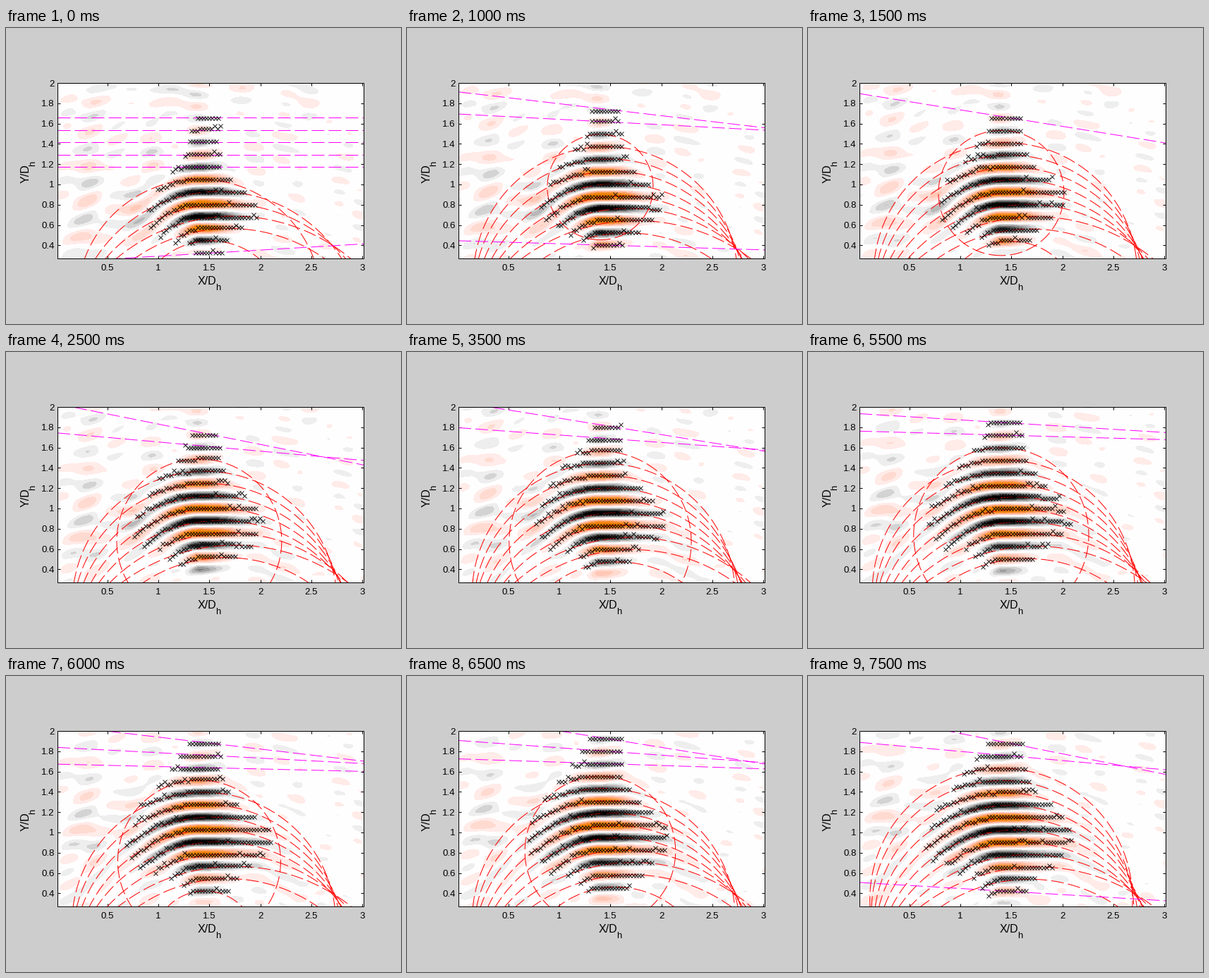
A matplotlib script for the animation above (8 s loop, 560x420 px).

```python
import numpy as np
import matplotlib.pyplot as plt
from matplotlib.animation import FuncAnimation
from matplotlib.colors import LinearSegmentedColormap

W, H, DPI = 560, 420, 100
PX = 72 / DPI
FRAMES, STEP = 16, 500
X0, X1, Y0, Y1 = 0.008, 3.015, 0.27, 2.0
SPACING, SPEED = 0.1215, 0.0387  # between crests, and rise per step
MID = 1.4                        # x where the crests peak

plt.rcParams["font.family"] = "Liberation Sans"
plt.rcParams["axes.linewidth"] = PX

steps = np.linspace(.08, .78, 8)
LEVELS = [-9, *-steps[::-1], *steps, 9]
cmap = LinearSegmentedColormap.from_list("wave", [
    (0, "#000000"), (.25, "#9c9c9c"), (.44, "#eeeeee"), (.5, "#ffffff"),
    (.56, "#ffecea"), (.75, "#ffb8a0"), (.87, "#fb9440"), (1, "#ee8000")])
COLORS = cmap(np.linspace(0, 1, len(LEVELS) - 1))


def top(k, f):
    return 0.93 + SPACING * k + SPEED * f


def lerp(a, b, w):
    return a + (b - a) * w


def bell(t, center, width):
    return np.exp(-((t - center) / width) ** 2)


def span(t, f):
    """Left and right end of the crest whose top is at height t."""
    w = (f / (FRAMES - 1)) ** 0.6
    left = 1.36 - lerp(.46, .69, w) * bell(t, lerp(.9, 1.18, w), lerp(.34, .5, w))
    right = 1.6 + lerp(.38, .5, w) * bell(t, lerp(.78, .95, w), lerp(.27, .4, w))
    return left, right


def power(t, f):
    w = (f / (FRAMES - 1)) ** 0.6
    floor = np.clip((t - lerp(.32, .22, w)) / .12, 0, 1)
    return (.15 + .8 * bell(t, lerp(.72, 1.05, w), .58)) * floor


def bend(x, u):
    """Drop of a crest below its top: round on the left, nearly flat on the right."""
    s, e = np.maximum(0, MID - x), np.maximum(0, x - 1.75)
    return s ** 2 / (2.4 * np.maximum(u, .16)) + .1 * e ** 2


gx, gy = np.meshgrid(np.arange(X0, X1 + .025, .025), np.arange(Y0, Y1 + .025, .025))
s, w = np.maximum(0, MID - gx), gy - .39
gt = gy + bend(gx, (w + np.sqrt(w ** 2 + s ** 2 / .6)) / 2)

rng = np.random.RandomState(11)
modes = [(rng.uniform(-17, 17), rng.uniform(.2, .34), rng.uniform(0, 2 * np.pi))
         for _ in range(40)]
haze = .065 + .05 * np.exp(-((gx - .65) / .45) ** 2 - ((gy - .85) / .5) ** 2)


def field(f):
    left, right = span(gt, f)
    sigma = np.where(gx < MID, (MID - left) / 1.9, (right - MID) / 1.8)
    packet = power(gt, f) * np.exp(-((gx - MID) / np.maximum(sigma, .07)) ** 2 / 2)
    wave = -packet * np.cos(np.pi * (gt - top(0, f)) / SPACING)
    rise = .6 * gy + .4 * gt - SPEED * f
    noise = sum(np.cos(kx * gx + 2 * np.pi * rise / lam + p) for kx, lam, p in modes)
    return wave + haze * noise * np.sqrt(2 / len(modes)) * (1 - packet)


def crests(f):
    """Marked crests, top one first."""
    low, high = np.interp(f, [0, 4], [.3, .4]), 1.72 + .016 * f
    return [k for k in range(8, -12, -1) if low < top(k, f) < high]


def outer_arc(f):
    """Crest and radius of the outermost fitted circle."""
    height = np.interp(f, [0, 2, 9, 15], [1.05, 1.49, 1.52, 1.62])
    r = np.interp(f, [0, 2, 5, 9, 13, 15], [1.2, .52, .81, .98, .74, 1.29])
    return round((height - top(0, f)) / SPACING), r


def arc(t):
    """Center x and radius of the circle through top t and its two feet."""
    heights = [.42, .5, .65, .9, 1.2, 1.6]
    a = np.interp(t, heights, [1.1, .88, .62, .4, .22, .1])
    b = np.interp(t, heights, [1.8, 2.42, 2.9, 2.8, 2.78, 2.68])
    depth, half = t - Y0, (b - a) / 2
    return (a + b) / 2, (half ** 2 + depth ** 2) / (2 * depth)


def crosses(f):
    xs, ys = [], []
    for k in crests(f):
        t = top(k, f)
        r = np.random.RandomState(100 * f + k + 50)
        a, b = np.array(span(t, f)) + r.uniform(-.03, .03, 2)
        x = np.arange(a, b, .0285)
        y = np.round((t - bend(x, t - .39)) / .025) * .025
        y += .025 * ((np.abs(x - MID) > .12) & (r.rand(len(x)) < .12))
        xs.append(x)
        ys.append(y)
    return np.concatenate(xs), np.concatenate(ys)


# Pixel lines snap half a pixel down and right of these edges
fig = plt.figure(figsize=(W / DPI, H / DPI), dpi=DPI, facecolor="#cdcdcd")
ax = fig.add_axes([73 / W, 1 - 327 / H, 434 / W, 249 / H])
ax.set(xlim=(X0, X1), ylim=(Y0, Y1), autoscale_on=False)
ax.set_xticks(np.arange(.5, 3.1, .5))
ax.set_yticks(np.arange(.4, 2.1, .2))
ax.xaxis.set_major_formatter("{x:.2g}")
ax.yaxis.set_major_formatter("{x:.2g}")
ax.tick_params(direction="in", top=True, right=True, length=4.3 * PX,
               width=PX, labelsize=13.3 * PX)
ax.tick_params(axis="x", pad=7.5 * PX)
ax.tick_params(axis="y", pad=4.5 * PX)


def label(x, y, s, size, angle=0):
    fig.text(x / W, 1 - y / H, s, size=size * PX, rotation=angle,
             rotation_mode="anchor", ha="left", va="baseline")


label(272, 364, "X/D", 16)
label(297.5, 372, "h", 13)
label(33, 220, "Y/D", 16, 90)
label(41, 196.5, "h", 13, 90)

angle = np.linspace(1.5 * np.pi, -.5 * np.pi, 400)
drawn = []


def dashed(x, y, color):
    drawn.extend(ax.plot(x, y, color=color, lw=PX, dashes=(18, 6),
                         dash_capstyle="butt"))


def circle(cx, t, r):
    x, y = cx + r * np.cos(angle), t - r + r * np.sin(angle)
    keep = y > Y0 - .03
    dashed(x[keep], y[keep], "#ff0000")


def line(t, slope):
    dashed([X0, X1], [t + slope * (x - 1.5) for x in (X0, X1)], "#ff00ff")


def draw(f):
    while drawn:
        drawn.pop().remove()
    drawn.append(ax.contourf(gx, gy, field(f), LEVELS, colors=COLORS, zorder=0))

    outer, radius = outer_arc(f)
    tilt = -.2 * abs(np.sin(np.pi * f / 10))
    for rank, k in enumerate(crests(f)):
        t = top(k, f)
        if k > outer:
            line(t, tilt * .45 ** rank)
        elif k == outer:
            circle(MID, t, radius)
        elif t < .418:
            line(t, .06 * np.cos(np.pi * f / 3))
        else:
            cx, r = arc(t)
            circle(cx, t, r)

    x, y = crosses(f)
    drawn.extend(ax.plot(x, y, "x", color="black", ms=6 * PX, mew=.85 * PX))
    return drawn


anim = FuncAnimation(fig, draw, frames=FRAMES, interval=STEP, init_func=lambda: [],
                     repeat=True, repeat_delay=0, blit=False)
plt.show()
```
